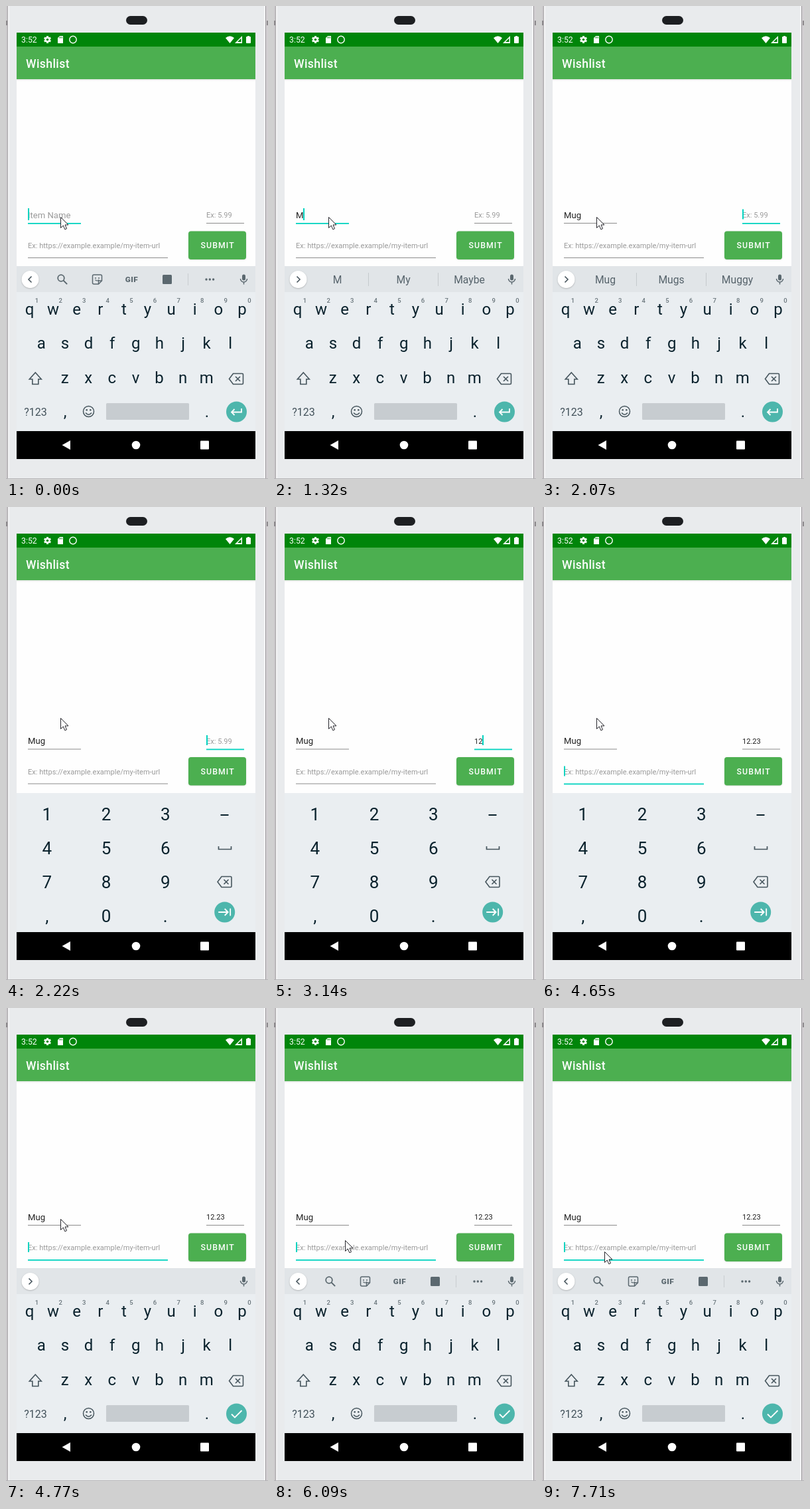
Animation, 395 px wide and 711 px high, one loop 8000 ms. Source, as an HTML page with a canvas:

```html
<!DOCTYPE html>
<html lang="en">
<head>
<meta charset="utf-8">
<title>Wishlist</title>
<style>
html, body { margin: 0; width: 100%; height: 100%; overflow: hidden; background: #e9ebed; }
canvas { display: block; width: 395px; height: 711px; }
</style>
</head>
<body>
<canvas id="stage"></canvas>
<script>
const W = 395, H = 711, LOOP = 8000, SHIFT = 37.5;
const GREEN = '#4caf50', TEAL = '#03d3c0', KEY = '#0a222d', ICON = '#5b686f', ENTER = '#4db6ac';
const canvas = document.getElementById('stage');
const ctx = canvas.getContext('2d');
const dpr = window.devicePixelRatio || 1;
canvas.width = W * dpr;
canvas.height = H * dpr;

// Timelines: [start in ms, value]
const nameText = [[0, ''], [1320, 'M'], [1580, 'Mu'], [1700, 'Mug']];
const priceText = [[0, ''], [2990, '1'], [3140, '12'], [3420, '12.'], [3820, '12.2'], [3940, '12.23']];
const focusField = [[0, 'name'], [2070, 'price'], [4650, 'url']];
const numberPad = [[0, false], [2220, true], [4770, false]];
const caretOn = [[0, true], [570, false], [1030, true], [2620, false], [2990, true], [4500, false],
  [4650, true], [5160, false], [5720, true], [6220, false], [6580, true], [7250, false], [7710, true]];
const toolbar = [[0, 'tools'], [1320, ['M', 'My', 'Maybe']], [1580, ['Mu', 'Must', 'Music']],
  [1700, ['Mug', 'Mugs', 'Muggy']], [4770, []], [4900, 'tools']];
const pointer = [[0, [82, 317]], [5970, [96, 333]], [6090, [107, 349]], [6220, [111, 361]],
  [6340, [107, 371]], [6460, [98, 369]], [6580, [94, 366]]];

function at(list, t) {
  let value = list[0][1];
  for (const [start, v] of list) if (t >= start) value = v;
  return value;
}

function rect(x, y, w, h, color) {
  ctx.fillStyle = color;
  ctx.fillRect(x, y, w, h);
}

function round(x, y, w, h, r, color) {
  ctx.fillStyle = color;
  ctx.beginPath();
  ctx.roundRect(x, y, w, h, r);
  ctx.fill();
}

function disc(x, y, r, color) {
  ctx.fillStyle = color;
  ctx.beginPath();
  ctx.arc(x, y, r, 0, Math.PI * 2);
  ctx.fill();
}

function ring(x, y, r, color, width) {
  ctx.strokeStyle = color;
  ctx.lineWidth = width;
  ctx.beginPath();
  ctx.arc(x, y, r, 0, Math.PI * 2);
  ctx.stroke();
}

// SVG path placed at x, y
function shape(d, x, y, fill, stroke, width = 1.5) {
  const path = new Path2D(d);
  ctx.save();
  ctx.translate(x, y);
  if (fill) { ctx.fillStyle = fill; ctx.fill(path); }
  if (stroke) { ctx.strokeStyle = stroke; ctx.lineWidth = width; ctx.stroke(path); }
  ctx.restore();
}

function text(s, x, y, size, color, align = 'left', weight = 400, spacing = 0) {
  ctx.font = `${weight} ${size}px Roboto, sans-serif`;
  ctx.letterSpacing = spacing + 'px';
  ctx.textAlign = align;
  ctx.fillStyle = color;
  ctx.fillText(s, x, y);
  return ctx.measureText(s).width;
}

function drawPhone() {
  rect(0, 0, W, H, '#e9ebed');
  rect(0, 0, 2, H, '#c9c6c9');
  rect(2, 0, 1, H, '#aaa7aa');
  rect(3, 0, 2, H, '#f5f5f6');
  rect(389, 0, 2, H, '#f5f5f6');
  rect(391, 0, 1, H, '#9b989b');
  rect(392, 0, 3, H, '#d2cfd2');
  rect(0, 22, 2, 7, '#8d8a8d');
  rect(393, 22, 2, 7, '#8d8a8d');
  rect(0, 710, W, 1, '#b5b5b7');
  round(181, 15, 32, 13, 6.5, '#1d1f22');
}

function drawStatusBar() {
  rect(16, 40, 360, 21, '#00850a');
  text('3:52', 23, 55, 12.3, '#fff');
  ctx.save();
  ctx.translate(62.5, 50.5);
  for (let i = 0; i < 6; i++) {
    rect(-1.5, -5.5, 3, 4, '#fff');
    ctx.rotate(Math.PI / 3);
  }
  ctx.restore();
  disc(62.5, 50.5, 4, '#fff');
  disc(62.5, 50.5, 1.8, '#00850a');
  shape('M3 0H8V11H0V3Z', 78, 45, '#fff');
  for (let i = 0; i < 3; i++) rect(80.3 + i * 1.8, 46.3, 0.9, 2.2, '#00850a');
  ring(101, 50.5, 5.2, '#fff', 1.4);
  shape('M0 3Q6.5 -2.5 13 3L6.5 11Z', 331, 45, '#fff');
  shape('M11 0V11H0Z', 345, 45, '#fff');
  shape('M2.5 0V5.5H-3Z', 352, 48.5, '#00850a');
  round(362, 46, 7, 10, 1, '#fff');
  rect(364, 45, 3, 2, '#fff');
}

function drawAppBar() {
  rect(16, 61, 360, 49, GREEN);
  text('Wishlist', 30, 93, 17.6, '#fff', 'left', 500, 0.4);
  const shade = ctx.createLinearGradient(0, 110, 0, 113);
  shade.addColorStop(0, '#e4e6e4');
  shade.addColorStop(1, '#fefefe');
  rect(16, 110, 360, 3, shade);
}

function drawField(f, value, focused, showCaret) {
  const w = value ? text(value, f.x, f.base, f.size, '#1f1f1f') : 0;
  if (!value) text(f.hint, f.x, f.base, f.size, '#9a9a9a');
  if (focused) rect(f.x, f.line, f.w, 1.8, TEAL);
  else rect(f.x, f.line, f.w, 1, '#8c8c8c');
  if (focused && showCaret) rect(Math.round(f.x + w), f.top, 2, f.tall, TEAL);
}

const fields = {
  name: { x: 33, w: 80, base: 318.5, line: 326, size: 13.1, top: 304, tall: 18, hint: 'Item Name' },
  price: { x: 302, w: 57, base: 318, line: 326, size: 11.04, top: 305.5, tall: 15, hint: 'Ex: 5.99' },
  url: { x: 33, w: 211, base: 364, line: 378, size: 11.04, top: 352, tall: 15,
    hint: 'Ex: https://example.example/my-item-url' }
};

function drawForm(t, shift) {
  const focus = at(focusField, t);
  const values = { name: at(nameText, t), price: at(priceText, t), url: '' };
  ctx.save();
  ctx.translate(0, shift);
  for (const id in fields) drawField(fields[id], values[id], id === focus, at(caretOn, t));
  ctx.shadowColor = 'rgba(0,0,0,.15)';
  ctx.shadowBlur = 2 * dpr;
  ctx.shadowOffsetY = 0.5 * dpr;
  round(275, 338.5, 87, 42.5, 4, GREEN);
  ctx.shadowColor = 'transparent';
  text('SUBMIT', 293.5, 364.4, 12.3, '#fff', 'left', 500, 1.09);
  ctx.restore();
}

function drawMic() {
  round(356, 403.5, 5, 9, 2.5, ICON);
  shape('M-5 -1.5A5 5 0 0 0 5 -1.5M0 3.5V7', 358.5, 411.5, null, ICON, 1.5);
}

function drawTools() {
  ring(83, 409, 4.8, ICON, 1.8);
  shape('M0 0L5.5 5.5', 86.6, 412.6, null, ICON, 2);
  shape('M2 0H12Q14 0 14 2V9L9 14H2Q0 14 0 12V2Q0 0 2 0ZM14 9H9V14', 130.5, 404, null, ICON, 1.5);
  disc(135, 409, 1, ICON);
  disc(140, 409, 1, ICON);
  shape('M0 0Q3 3 5.5 0', 134.5, 411.5, null, ICON, 1.2);
  text('GIF', 189.5, 415, 11.8, ICON, 'center', 900, 0.5);
  round(236, 404, 14, 14, 1.5, ICON);
  rect(274, 402, 1, 18, '#c9ced1');
  for (let i = 0; i < 3; i++) disc(302 + i * 5.3, 411, 1.7, ICON);
}

function drawToolbar(mode) {
  rect(16, 391, 360, 39, '#e1e5e8');
  const open = mode === 'tools';
  ctx.save();
  ctx.shadowColor = 'rgba(0,0,0,.25)';
  ctx.shadowBlur = 2 * dpr;
  ctx.shadowOffsetY = 0.7 * dpr;
  disc(36.5, 411, 13, '#fff');
  ctx.restore();
  shape(open ? 'M2 -4.5L-2.5 0L2 4.5' : 'M-2 -4.5L2.5 0L-2 4.5', 36.5, 411, null, '#46545c', 1.6);
  drawMic();
  if (open) return drawTools();
  mode.forEach((word, i) => text(word, 95.5 + i * 99.5, 417, 15.7, '#56636b', 'center'));
  if (mode.length) for (const x of [142, 247]) rect(x, 401, 1, 20, '#c5cacd');
}

function drawBackspace(x, y) {
  shape('M-4.5 -8H9Q10.5 -8 10.5 -6.5V6.5Q10.5 8 9 8H-4.5L-10.5 0ZM-1 -3.5L6 3.5M6 -3.5L-1 3.5',
    x, y, null, '#46555d', 1.6);
}

function drawLetters(done) {
  rect(16, 430, 360, 209, '#eaeef1');
  const rows = [['qwertyuiop', 35.5, 463.5], ['asdfghjkl', 53.4, 515], ['zxcvbnm', 88.7, 567]];
  for (const [keys, x0, y] of rows)
    [...keys].forEach((k, i) => text(k, x0 + i * 35.6, y, 24, KEY, 'center'));
  for (let i = 0; i < 10; i++) text((i + 1) % 10, 46.5 + i * 35.6, 446, 9.5, '#69757b', 'center', 500);
  shape('M0 -9L9 1H4.5V8.5H-4.5V1H-9Z', 44.3, 560, null, '#46555d', 1.6);
  drawBackspace(347, 560.5);
  text('?123', 44.5, 615.5, 16, '#43525b', 'center');
  text(',', 89, 618, 24, KEY, 'center');
  text('.', 303, 618, 24, KEY, 'center');
  ring(124.5, 609.5, 8, '#46555d', 1.5);
  disc(121.7, 607.3, 1.3, '#46555d');
  disc(127.3, 607.3, 1.3, '#46555d');
  shape('M-4.5 0Q0 5.5 4.5 0', 124.5, 611.5, null, '#46555d', 1.4);
  round(151, 597, 125, 25, 1.5, '#c7ccd0');
  disc(347.5, 610, 15.5, ENTER);
  shape(done ? 'M-7.5 0.5L-2.5 5.5L8 -5' : 'M7.5 -5V0.5H-7M-3 -4L-7.5 0.5L-3 5', 347.5, 610, null, '#fff', 1.8);
}

function drawNumbers() {
  rect(16, 430, 360, 209, '#eaeef1');
  ['123', '456', '789', ',0.'].forEach((row, r) =>
    [...row].forEach((k, c) => text(k, 61.7 + c * 89.3, 471 + r * 50.9, 26, KEY, 'center')));
  rect(323.5, 462, 12, 2, KEY);
  shape('M-9.5 -2.5V2H9.5V-2.5', 330, 512.5, null, '#46555d', 1.7);
  drawBackspace(329.5, 563.5);
  disc(329.7, 609, 15.5, ENTER);
  shape('M-9.5 0H4.5M0 -5L5 0L0 5M8.5 -5.5V5.5', 329.7, 609, null, '#fff', 1.8);
}

function drawNav() {
  rect(16, 639, 360, 42, '#000');
  shape('M0 0L12.5 -7V7Z', 84.5, 660, '#fff');
  disc(196, 660, 6.3, '#fff');
  round(293, 653.5, 13, 13, 1, '#fff');
}

function drawPointer([x, y]) {
  shape('M0 0V16L3.8 12.5L6.3 18.3L9 17.2L6.5 11.5H11.5Z', x + 0.5, y + 0.5, '#fff', '#25252b', 1);
}

function draw(t) {
  const pad = at(numberPad, t);
  ctx.setTransform(dpr, 0, 0, dpr, 0, 0);
  drawPhone();
  rect(16, 110, 360, 320, '#fefefe');
  drawStatusBar();
  drawAppBar();
  drawForm(t, pad ? SHIFT : 0);
  if (pad) drawNumbers();
  else {
    drawToolbar(at(toolbar, t));
    drawLetters(at(focusField, t) === 'url');
  }
  drawNav();
  drawPointer(at(pointer, t));
}

const start = performance.now();
function tick() {
  draw((performance.now() - start) % LOOP);
  requestAnimationFrame(tick);
}
tick();
</script>
</body>
</html>
```
